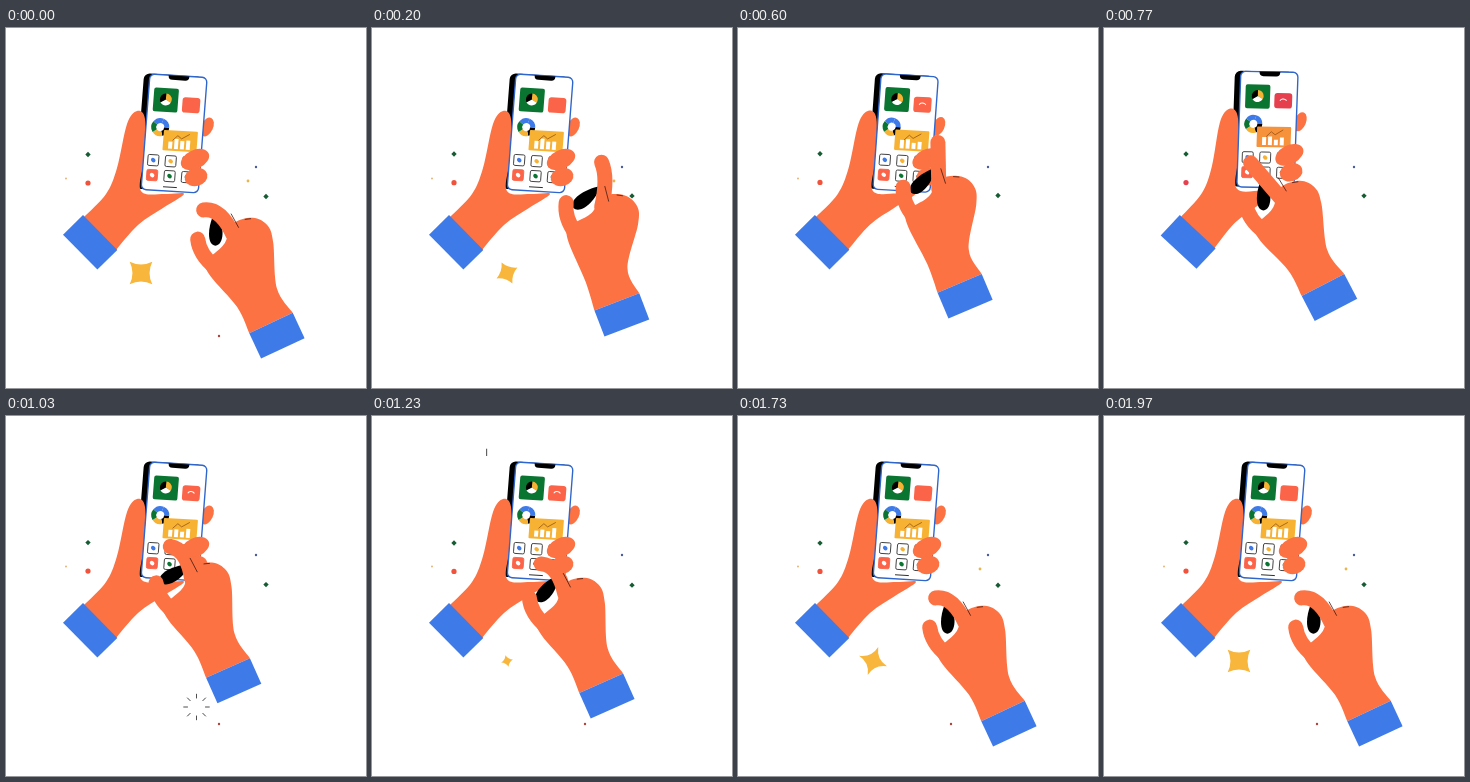
Recreate the animation shown at these times as an HTML page with a canvas. Size 360 px wide and 360 px high, loop 2.01 s.

```html
<!DOCTYPE html>
<html lang="en">
<head>
<meta charset="utf-8">
<title>Phone in hand</title>
<style>
html, body { margin: 0; width: 100%; height: 100%; overflow: hidden; background: #fff; }
canvas { display: block; }
</style>
</head>
<body>
<canvas id="stage" width="360" height="360"></canvas>
<script>
const c = document.getElementById('stage').getContext('2d');
const LOOP = 2010, TAU = Math.PI * 2, DEG = Math.PI / 180;
const SKIN = '#fc7243', BLUE = '#3e7ae8', GREEN = '#0a7431', YELLOW = '#f7b234', RED = '#fb6448',
  CRIMSON = '#e63f4d', INK = '#000', DARK = '#3a1710';

const linear = k => k;
const smooth = k => k * k * (3 - 2 * k);
const easeIn = k => k * k;
const easeOut = k => 1 - (1 - k) ** 2;

// Wrist x, y, then degrees: arm, palm bend, finger direction, finger curl, shadow turn
const rest = [265, 295, -25, 0, 0, -73, 25];
const flick = [225, 253, -17, 20, 47, 0, 99];
const tap = [219, 257, -27.6, 0, -13, 0, 27];
const curl = [222, 252, -24, 0, 15, -71, 84];
const lift = [229, 267, -24, 0, 11, -73, 64];
const handKeys = [[0, rest], [400, flick, smooth], [770, tap, smooth], [1030, curl, smooth],
  [1230, lift, easeIn], [1530, rest, easeOut], [LOOP, rest]];

// Radius, degrees, waist
const starKeys = [[0, [16, 45, .36]], [400, [7.5, 80, .45]], [520, [0, 90, .4]], [1140, [0, -30, .4]],
  [1230, [6, -15, .35]], [1530, [14, 0, .16], easeOut], [1970, [16, 45, .36]], [LOOP, [16, 45, .36]]];

function at(keys, t) {
  let i = 1;
  while (i < keys.length - 1 && t > keys[i][0]) i++;
  const [t0, a] = keys[i - 1], [t1, b, ease = linear] = keys[i];
  const k = ease((t - t0) / (t1 - t0));
  return a.map((v, n) => v + (b[n] - v) * k);
}

function group(x, y, deg, paint) {
  c.save();
  c.translate(x, y);
  c.rotate(deg * DEG);
  paint();
  c.restore();
}

function fill(color) {
  c.fillStyle = color;
  c.fill();
}

function stroke(color, width) {
  c.strokeStyle = color;
  c.lineWidth = width;
  c.stroke();
}

function line(pts, color, width) {
  c.beginPath();
  pts.forEach(p => c.lineTo(...p));
  stroke(color, width);
}

function oval(x, y, rx, ry, deg, color) {
  c.beginPath();
  c.ellipse(x, y, rx, ry, deg * DEG, 0, TAU);
  fill(color);
}

function box(x, y, w, h, r, color) {
  c.beginPath();
  c.roundRect(x, y, w, h, r);
  fill(color);
}

function ring(x, y, r, width, colors, turn) {
  const step = TAU / colors.length;
  colors.forEach((color, i) => {
    c.beginPath();
    c.arc(x, y, r, turn + i * step, turn + (i + 1) * step);
    stroke(color, width);
  });
}

// Open spline through the points, closed by a straight edge
function blob(pts, color) {
  const p = i => pts[Math.max(0, Math.min(pts.length - 1, i))];
  c.beginPath();
  c.moveTo(...pts[0]);
  for (let i = 0; i < pts.length - 1; i++) {
    const [a, b, d, e] = [p(i - 1), p(i), p(i + 1), p(i + 2)];
    c.bezierCurveTo(b[0] + (d[0] - a[0]) / 6, b[1] + (d[1] - a[1]) / 6,
      d[0] - (e[0] - b[0]) / 6, d[1] - (e[1] - b[1]) / 6, ...d);
  }
  fill(color);
}

function digit(x, y, bendX, bendY, tipX, tipY) {
  c.beginPath();
  c.moveTo(x, y);
  c.quadraticCurveTo(bendX, bendY, tipX, tipY);
  c.lineCap = 'round';
  stroke(SKIN, 15);
  c.lineCap = 'butt';
}

function inPhone(paint) {
  c.save();
  c.transform(.985, .06, -.077, .995, 144, 46);
  paint();
  c.restore();
}

function screen(t, press) {
  box(0, 0, 58, 116, 5, '#fff');
  stroke('#2f66cc', 1.4);
  box(19, 0, 21, 4.5, [0, 0, 4, 4], INK);

  box(5.5, 13, 25, 24, 2, GREEN);
  ring(18, 24.5, 3, 6, [YELLOW, '#fff', INK], -TAU / 4);
  box(35, 21, 18, 15.5, 3, press ? CRIMSON : RED);
  if (t > 300 && t < 1600) {
    c.beginPath();
    c.arc(44, 31, 4, 3.7, 5.7);
    stroke('#fff', 1);
  }

  ring(14.5, 52.5, 6.6, 5, [INK, YELLOW, GREEN, BLUE, BLUE], 0);
  box(18.5, 55, 34.5, 20.5, 1, press ? '#f6923c' : YELLOW);
  for (let i = 0; i < 4; i++) {
    const h = 7 + i % 2 * 2 + 1.5 * Math.sin(t / LOOP * TAU + i);
    box(24 + i * 6, 73.5 - h, 4, h, 0, '#fff');
  }
  line([[28, 65], [33, 60], [37, 63], [45, 58]], '#8a4b12', .7);

  [BLUE, YELLOW, '#444', '#fff', GREEN, '#444'].forEach((color, i) => {
    const x = 10 + i % 3 * 17.7, y = i < 3 ? 86 : 101, red = i === 3;
    box(x - 5.5, y - 5.5, 11, 11, 1.5, red ? RED : '#fff');
    stroke(red ? RED : '#333', .9);
    oval(x, y, 2.5, 2, 35, color);
  });
  line([[22, 112], [36, 112]], INK, .8);
}

function leftHand(t, press) {
  const push = smooth(Math.min(1, Math.max(0, 1.6 - Math.abs(t - 775) / 125)));
  c.save();
  c.translate(75, 215);
  c.rotate(-.042 * push);
  c.translate(-75, -215);
  oval(201, 99, 6, 10, 25, SKIN);
  inPhone(() => box(-6, -.5, 60, 116, 6, INK));
  blob([[78, 189], [100, 166], [111, 140], [121, 96], [131, 83], [139, 91], [138, 130], [135, 163],
    [160, 166], [178, 166], [157, 180], [132, 197], [110, 222]], SKIN);
  inPhone(() => screen(t, press));
  group(77, 187, 45.5, () => box(0, 0, 49, 28, 0, BLUE));
  oval(189, 131.5, 15, 9.5, -25, SKIN);
  oval(190, 149, 11.5, 9, -14, SKIN);
  c.restore();
}

const palm = [[-24, 0], [-24, 29], [-35, 68], [-34, 84], [-22, 87], [-8, 92], [8, 106], [28, 103],
  [38, 90], [36, 72], [20, 29], [24, 0]];

function rightHand(t) {
  const [x, y, arm, bend, point, hook, shade] = at(handKeys, t);
  const knuckle = [3, -96];
  const reach = ([px, py], deg, length) => [px + length * Math.sin(deg * DEG), py - length * Math.cos(deg * DEG)];
  const joint = reach(knuckle, point, 30);
  const tip = reach(joint, point + hook, 17);

  group(x, y, arm + bend, () => {
    group(-11, -108, shade, () => {
      c.beginPath();
      c.moveTo(0, -19);
      c.bezierCurveTo(10, -4, 9, 15, 0, 16);
      c.bezierCurveTo(-9, 15, -8, -4, 0, -19);
      fill(INK);
    });
    digit(-27, -74, -36, -92, -31, -107);
    digit(...knuckle, ...joint, ...tip);
  });
  group(x, y, arm, () => {
    // The bend grows from the wrist up to the middle of the palm.
    blob(palm.map(([px, py]) => {
      const a = bend * DEG * Math.min(1, py / 75);
      return [px * Math.cos(a) + py * Math.sin(a), px * Math.sin(a) - py * Math.cos(a)];
    }), SKIN);
    box(-24, 0, 48, 28, 0, BLUE);
  });
  group(x, y, arm + bend, () => {
    line([[10, -116], [11, -100]], DARK, .7);
    line([[20, -105], [26, -103]], DARK, .7);
  });
}

function star(t) {
  const [r, deg, waist] = at(starKeys, t);
  const polar = (radius, turn) => [radius * Math.cos(turn * TAU), radius * Math.sin(turn * TAU)];
  group(135, 245, deg, () => {
    c.beginPath();
    c.moveTo(r, 0);
    for (let i = 1; i < 5; i++) c.quadraticCurveTo(...polar(r * waist, i / 4 - 1 / 8), ...polar(r, i / 4));
    fill('#f8b63c');
  });
}

function burst(t, start, length) {
  const k = (t - start) / length;
  if (k < 0 || k > 1) return;
  const r = 3 + 16 * k;
  for (let i = 0; i < 8; i++) {
    group(190.5, 291, i * 45, () => line([[r, 0], [r + 6 - 4 * k, 0]], '#222', .8));
  }
}

function dots(t, press) {
  const sway = Math.sin(t / LOOP * TAU);
  const diamond = (x, y) => group(x, y, 45, () => box(-1.9, -1.9, 3.8, 3.8, 0, '#155c33'));
  const dot = (x, y, r, color) => oval(x, y, r, r, 0, color);
  diamond(82, 126.5 - sway * .8);
  diamond(260, 168.5 - sway);
  dot(82, 155 - sway * .6, 2.6, press ? CRIMSON : '#f0523c');
  dot(250, 139, 1.2, '#4a5a9a');
  if (t < 300 || t > 1400) dot(242, 153, 1.4, '#e8b64a');
  if (!press) dot(60, 150.5, 1, '#e3b57a');
  if (t < 60 || t > 950) dot(213, 308, 1.2, '#b0413c');
  const k = (t - 1130) / 470;
  if (k > 0 && k < 1) line([[114 + 3 * k, 31 + 8 * k], [114 + 3 * k, 40]], '#333', .9);
}

function draw(t) {
  const press = t > 640 && t < 920;
  c.clearRect(0, 0, 360, 360);
  dots(t, press);
  star(t);
  for (const [start, length] of [[350, 210], [930, 290], [1350, 250]]) burst(t, start, length);
  leftHand(t, press);
  rightHand(t);
}

const begin = performance.now();
function tick() {
  draw((performance.now() - begin) % LOOP);
  requestAnimationFrame(tick);
}
tick();
</script>
</body>
</html>
```
